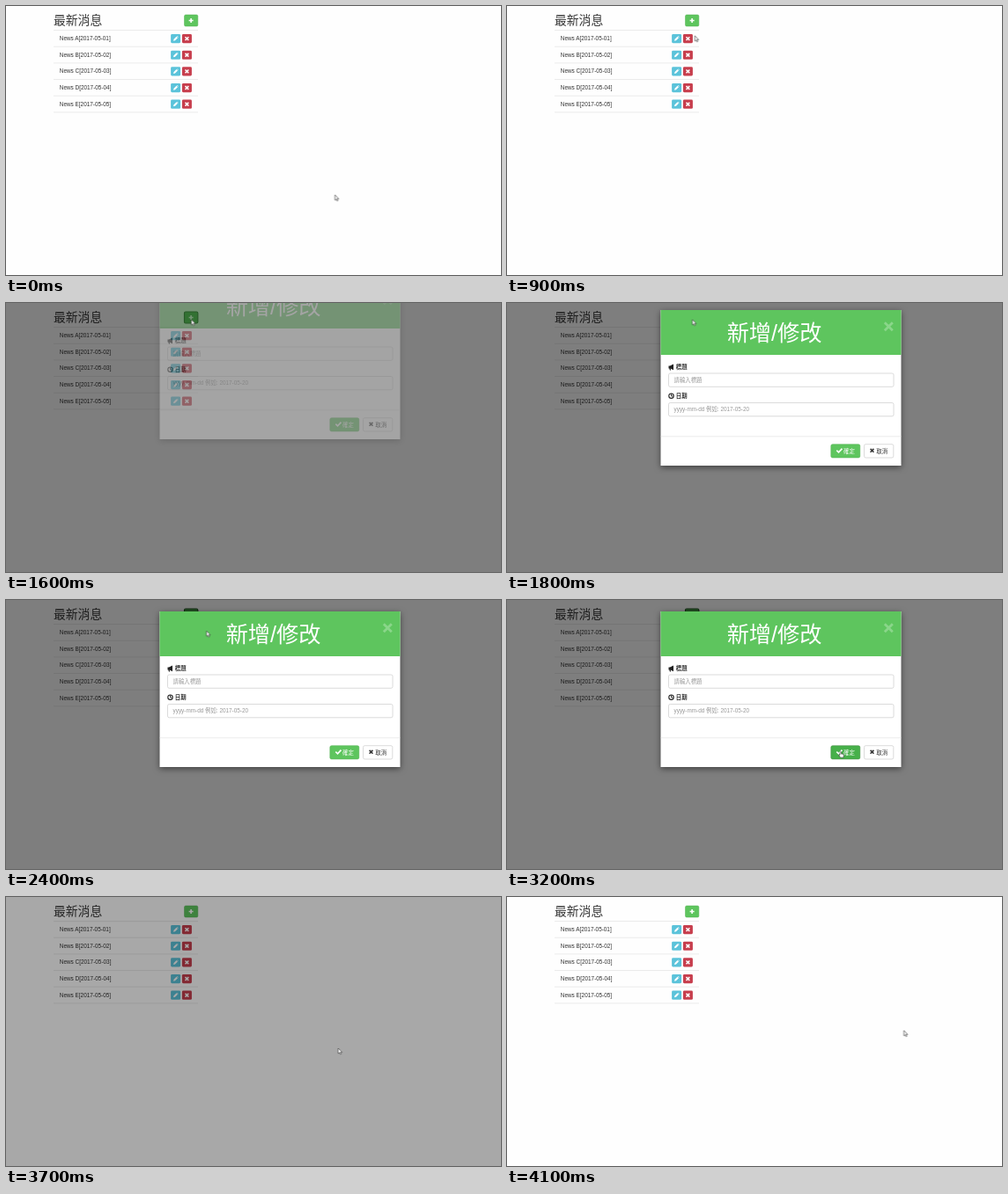
These frames come from a looping animation (562 by 306 pixels, 4.2 s). An HTML page:

```html
<!DOCTYPE html>
<html lang="zh-Hant">
<head>
<meta charset="utf-8">
<title>最新消息</title>
<style>
  html, body { margin: 0; width: 100%; height: 100%; overflow: hidden; background: #fefefe; }
  svg { display: block; width: 562px; height: 306px; }
  text { font: 6.4px "Liberation Sans", "Noto Sans CJK TC", "Noto Sans CJK", sans-serif; fill: #333; }
  .heading { font-size: 13.8px; font-weight: 300; }
  .title { font-size: 25.2px; font-weight: 300; fill: #fff; text-anchor: middle; }
  .label { font-weight: 700; }
  .hint { fill: #999; }
  .rule { stroke: #ddd; stroke-width: .6; }
  .field { fill: #fff; stroke: #ccc; stroke-width: .7; }
  .green { fill: #5ec55e; stroke: #4cae4c; stroke-width: .5; }
  .icon { fill: none; stroke: #fff; stroke-width: 1.6; }
  .dark { stroke: #333; }

  .anim { animation: 4200ms step-end infinite; }
  #backdrop { animation-name: backdrop; }
  #modal { animation-name: modal; }
  #add { animation-name: add; }
  #confirm { animation-name: confirm; }
  #cursor { animation-name: cursor; }
  #arrow { animation-name: arrow; }
  #hand { animation-name: hand; }

  @keyframes backdrop {
    0%, 100% { opacity: 0; }
    35.71% { opacity: .34; }
    38.09% { opacity: .5; }
    88.09% { opacity: .34; }
    90.47% { opacity: 0; }
  }
  @keyframes modal {
    0%, 100% { opacity: 0; transform: translateY(-44px); }
    38.09% { opacity: .3; transform: translateY(-35px); }
    40.47% { opacity: 1; transform: translateY(-16px); }
    42.85% { opacity: 1; transform: translateY(-5px); }
    45.23% { opacity: 1; transform: none; }
    80.95% { opacity: .67; transform: translateY(-12px); }
    83.33% { opacity: 0; transform: translateY(-44px); }
  }
  @keyframes add {
    0%, 100% { fill: #5ec55e; stroke: #4cae4c; stroke-width: .5; }
    28.57% { fill: #449d44; stroke: #398439; stroke-width: .5; }
    30.95% { fill: #449d44; stroke: #255625; stroke-width: 1.2; }
    83.33% { fill: #5ec55e; stroke: #4cae4c; stroke-width: .5; }
  }
  @keyframes confirm {
    0%, 100% { fill: #5ec55e; stroke: #4cae4c; }
    73.8% { fill: #47b04a; stroke: #398439; }
    83.33% { fill: #5ec55e; stroke: #4cae4c; }
  }
  @keyframes cursor {
    0%, 100% { transform: translate(373.5px, 214.8px); }
    11.9% { transform: translate(371px, 212px); }
    14.28% { transform: translate(364px, 206px); }
    16.66% { transform: translate(318px, 150px); }
    19.04% { transform: translate(250px, 72px); }
    21.42% { transform: translate(213.3px, 33.8px); }
    23.8% { transform: translate(212px, 27px); }
    26.19% { transform: translate(211px, 22px); }
    28.57% { transform: translate(210.5px, 18.8px); animation-timing-function: step-end; }
    54.76% { transform: translate(210.5px, 18.8px); animation-timing-function: steps(3); }
    61.9% { transform: translate(262px, 68px); animation-timing-function: steps(3); }
    69.04% { transform: translate(355px, 150px); animation-timing-function: steps(2); }
    73.8% { transform: translate(378px, 172.2px); }
    83.33% { transform: translate(377.2px, 172px); }
    97.61% { transform: translate(450.6px, 151.8px); }
  }
  @keyframes arrow {
    0%, 100% { opacity: 1; }
    28.57% { opacity: 0; }
    38.09% { opacity: 1; }
    73.8% { opacity: 0; }
    83.33% { opacity: 1; }
  }
  @keyframes hand {
    0%, 100% { opacity: 0; }
    28.57% { opacity: 1; }
    38.09% { opacity: 0; }
    73.8% { opacity: 1; }
    83.33% { opacity: 0; }
  }
</style>
</head>
<body>
<svg viewBox="0 0 562 306">
  <defs>
    <path id="cross" d="M-1.9-1.9 1.9 1.9M1.9-1.9-1.9 1.9"/>
    <g id="pencil" fill="#fff">
      <path d="M-2.6 2.6-2.1.6.9-2.4 2.4-.9-.6 2.1Z"/>
      <path d="M1.3-2.7 1.8-3 3 -1.8 2.7-1.3Z"/>
    </g>
  </defs>

  <text class="heading" x="54" y="21">最新消息</text>
  <rect id="add" class="green anim" x="202.5" y="10" width="15.3" height="13" rx="1.5"/>
  <path class="icon" d="M207.6 16.5h5M210.1 14v5"/>
  <g id="list"></g>

  <rect id="backdrop" class="anim" width="562" height="306" opacity="0"/>

  <g id="modal" class="anim" opacity="0">
    <g transform="translate(174.5 13)">
      <rect width="273" height="177" fill="#fff" style="filter:drop-shadow(0 2px 3.5px rgba(0,0,0,.5))"/>
      <rect width="273" height="51" fill="#5ec55e"/>
      <text class="title" x="129" y="35.4">新增/修改</text>
      <path d="M254.3 14.2 263.3 23.2M263.3 14.2 254.3 23.2" stroke="#8ad68a" stroke-width="2.8"/>

      <path d="M9 63.6h1.5l4-2v6.6l-3.4-1.8.6 2h-1.3l-.6-2H9Z" fill="#222"/>
      <text class="label" x="17.3" y="67.3">標題</text>
      <rect class="field" x="9" y="72" width="255.5" height="15.3" rx="1.8"/>
      <text class="hint" x="15" y="82">請輸入標題</text>

      <path d="M12 95.2v2.7h2" fill="none" stroke="#222" stroke-width=".9"/>
      <circle cx="12" cy="97.7" r="2.7" fill="none" stroke="#222" stroke-width="1.1"/>
      <text class="label" x="17.3" y="100.2">日期</text>
      <rect class="field" x="9" y="105.5" width="255.5" height="15.3" rx="1.8"/>
      <text class="hint" x="15" y="115.4">yyyy-mm-dd 例如: 2017-05-20</text>

      <path class="rule" d="M0 143.8H273"/>
      <rect id="confirm" class="green anim" x="193.3" y="152.7" width="33" height="15.3" rx="1.8"/>
      <path class="icon" d="M199.8 159.7 202 161.8 206 157.6"/>
      <text x="207.6" y="162.6" style="fill:#fff">確定</text>
      <rect class="field" x="231" y="152.7" width="33.3" height="15.3" rx="1.8"/>
      <use href="#cross" class="icon dark" x="240" y="159.8"/>
      <text x="244.8" y="162.6">取消</text>
    </g>
  </g>

  <g id="cursor" class="anim" fill="#fff" stroke="#333" stroke-width=".6" stroke-linejoin="round">
    <path id="arrow" class="anim" d="M0 0V6.1L1.4 4.9 2.4 7 3.4 6.5 2.5 4.5H4.3Z"/>
    <path id="hand" class="anim" opacity="0" d="M0 .4Q.7-.4 1.3.4V2.7L4 3.3Q4.6 3.5 4.5 4.2L4 7H.7L-1.6 4.3Q-1.3 3.4 0 4.3Z"/>
  </g>
</svg>
<script>
  const PITCH = 18.65;
  const rule = y => `<path class="rule" d="M54 ${y}H218"/>`;
  const button = (x, color, icon) =>
    `<rect x="${x}" y="32" width="11" height="10.2" rx="1.4" fill="${color}"/>` +
    `<use href="#${icon}" class="${icon === 'cross' ? 'icon' : ''}" x="${x + 5.5}" y="37.1"/>`;

  document.getElementById('list').innerHTML = [...'ABCDE'].map((letter, i) =>
    `<g transform="translate(0 ${i * PITCH})">${rule(27.6)}
      <text x="60.8" y="39.2">News ${letter}[2017-05-0${i + 1}]</text>
      ${button(187.1, '#5bc3da', 'pencil')}${button(199.9, '#c73e4d', 'cross')}
    </g>`).join('') + rule(27.6 + 5 * PITCH);
</script>
</body>
</html>
```
